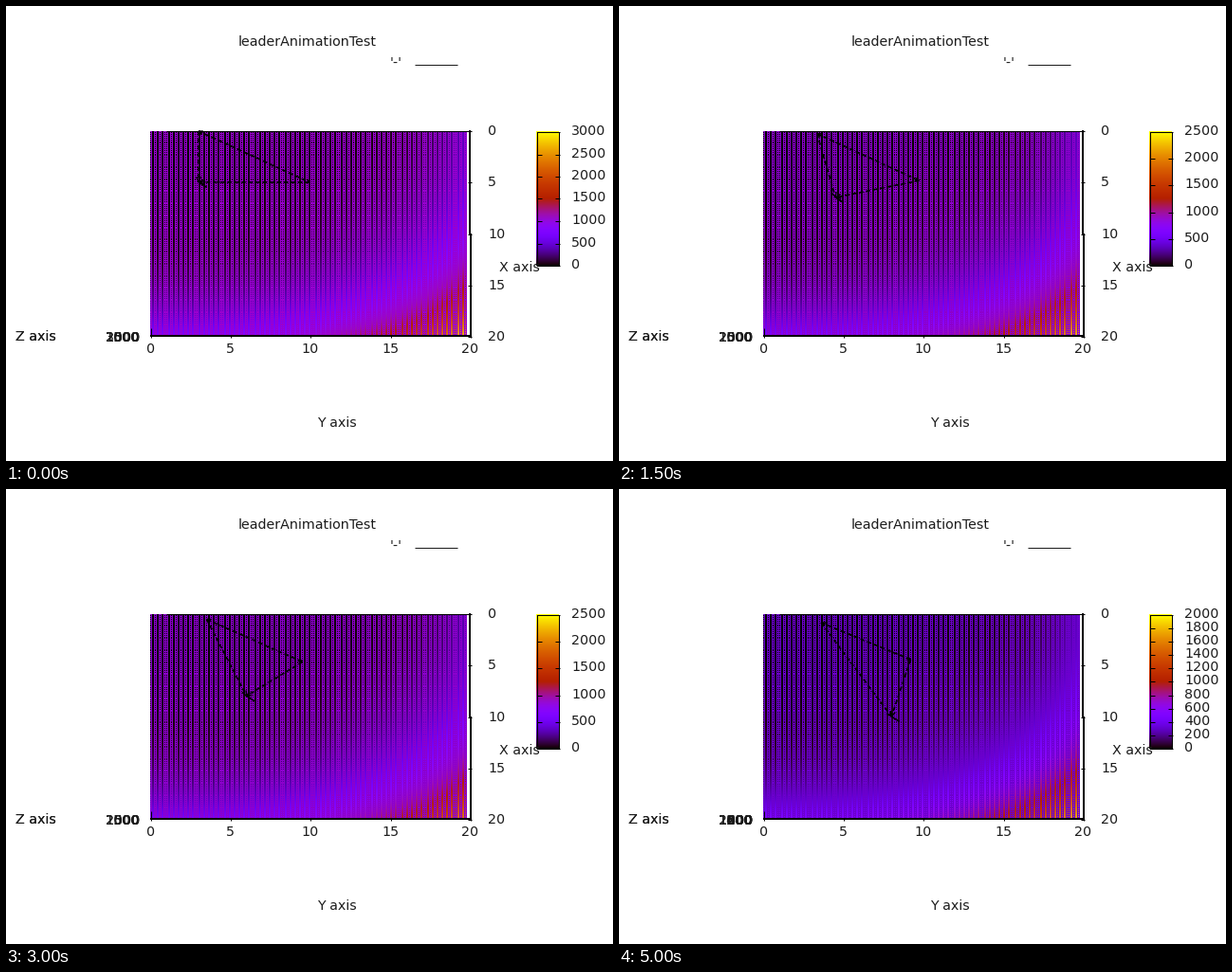
Recreate the animation shown at these times as a matplotlib script. Size 640x480 px, loop 5.5 s.

```python
import matplotlib.pyplot as plt
import numpy as np
from matplotlib.animation import FuncAnimation

W, H, DPI = 640, 480, 100
FRAMES, INTERVAL = 11, 500
LEFT, RIGHT, TOP, BOTTOM = 152, 486, 132, 348
SX, SY = 337 / 20, 217 / 20
PX = 72 / DPI
INK = "#1c1c1c"

plt.rcParams["font.family"] = "DejaVu Sans"
fig = plt.figure(figsize=(W / DPI, H / DPI), dpi=DPI, facecolor="white")
ax = fig.add_axes([0, 0, 1, 1])


def palette(g):
    g = np.clip(g, 0, 1)
    return np.stack([np.sqrt(g), g ** 3, np.clip(np.sin(2 * np.pi * g), 0, 1)], -1)


def line(xs, ys, width=1, **kw):
    kw.setdefault("color", "black")
    ax.plot(np.add(xs, 0.5), np.add(ys, 0.5), lw=width * PX,
            solid_capstyle="butt", **kw)


def label(x, y, s, ha="left"):
    # y is the middle of the digits
    ax.text(x, y + 5, s, ha=ha, va="baseline", fontsize=14.2 * PX, color=INK)


def scale(k):
    """Upper end and step of the colour range."""
    if k < 3:
        return 3000, 500
    return (2500, 500) if k < 10 else (2000, 200)


# Mesh of 200 x 200 wires, rounded to whole pixels
cols, rows = np.meshgrid(np.arange(LEFT, RIGHT), np.arange(TOP, BOTTOM))
wires = np.round(LEFT + np.arange(200) * SX / 10).astype(int)
on_wire = np.isin(cols, wires)
paired = on_wire & (np.isin(cols - 1, wires) | np.isin(cols + 1, wires))
# Every second row is a plain line; rounding shifts the order every 12 pixels
plain_row = np.floor((rows - 131) * 10 / SY).astype(int) % 2 == 0
plain = ~on_wire | (plain_row & ~paired)

u, v = (rows - 131) / 217, (cols - LEFT) / 337
SURFACE = 0.25 * u ** 5 + 0.16 * v ** 8 + 0.53 * u ** 2 * v ** 2.5


def mesh(k):
    top = scale(k)[0]
    base = {3000: (153, 0, 208), 2500: (140, 0, 205), 2000: (108, 0, 205)}[top]
    peak = 3000 * (0.6 + 0.4 * np.exp(-0.18 * k))
    val = palette(SURFACE * peak / top)
    return np.where(plain[..., None], np.array(base) / 255, val)


def head(tip, tail, size=5):
    ang = np.arctan2(tail[1] - tip[1], tail[0] - tip[0])
    for a in (ang - 0.4, ang + 0.4):
        line([tip[0], tip[0] + size * np.cos(a)],
             [tip[1], tip[1] + size * np.sin(a)], 1.4)


def triangle(k):
    a = (202.5 + 11 * (1 - np.exp(-0.25 * k)), 131.5 + 0.9 * k)
    b = (LEFT + (3 + 0.5 * k) * SX, 131 + (5 + 0.5 * k) * SY)
    c = (319.5 - 1.25 * k, 185.5 - 0.6 * k)
    for p, q in ((a, b), (c, b), (a, c)):
        line([p[0], q[0]], [p[1], q[1]], 1.7, linestyle=(0, (2.8, 1.6)))
    goal = (b[0] + SX / 2, b[1] + SY / 2)
    line([b[0], goal[0]], [b[1], goal[1]], 1.7)
    head(b, a, 6)
    head(b, c, 6)
    head(a, c)
    head(c, a, 4)


def frame_box():
    # The view is turned by a fraction of a degree
    line([168, 488], [131, 131])
    line([488, 490], [131, 348], antialiased=False)
    line([152, 490], [348, 347], antialiased=False)
    line([152, 152], [339, 348])
    for i in range(5):
        x, y = LEFT + i * 5 * SX, round(131 + i * 5 * SY)
        line([round(x)] * 2, [346, 349])
        line([486, 490], [y, y])
        label(x + 0.5, 361, str(5 * i), "center")
        label(508, y, str(5 * i))


def color_box(k):
    top, step = scale(k)
    ramp = palette(np.linspace(1, 0, 142))[:, None]
    ax.imshow(ramp, extent=(559, 583, 274, 132), interpolation="nearest", aspect="auto")
    line([559, 582, 582, 559, 559], [132, 132, 273, 273, 132])
    for val in range(0, top + 1, step):
        y = 273 - 141 * val / top
        line([559, 564], [round(y)] * 2)
        line([578, 583], [round(y)] * 2)
        label(596, y - 1, str(val))
        label(141, 349, str(val), "right")


def draw(k):
    ax.clear()
    ax.axis("off")
    ax.imshow(mesh(k), extent=(LEFT, RIGHT, BOTTOM, TOP), interpolation="nearest",
              aspect="auto")
    frame_box()
    color_box(k)
    triangle(k)
    label(318, 37.5, "leaderAnimationTest", "center")
    label(417.5, 58.5, "'-'", "right")
    line([430, 475], [61, 61], color=INK)
    label(520, 275.5, "X axis")
    label(348.5, 438.5, "Y axis", "center")
    for _ in range(2):
        label(10, 348, "Z axis")
    ax.set_xlim(0, W)
    ax.set_ylim(H, 0)
    return []


anim = FuncAnimation(fig, draw, frames=FRAMES, interval=INTERVAL,
                     init_func=lambda: [], repeat=True, repeat_delay=0)
plt.show()
```
